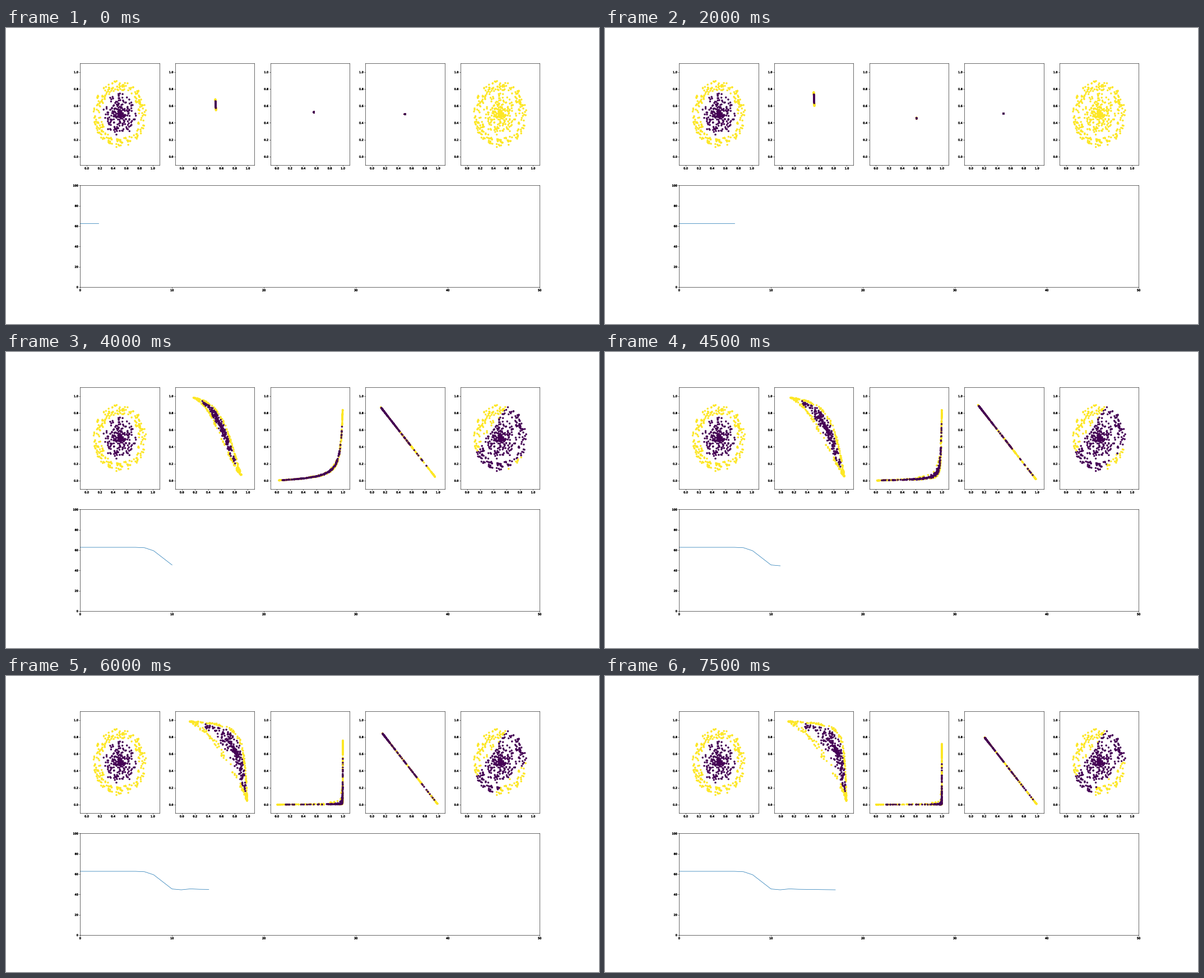
Write a matplotlib script that moves like this. It is 1058x529 px and loops after 8000 ms.

```python
import numpy as np
import matplotlib.pyplot as plt
from matplotlib.animation import FuncAnimation
from matplotlib.patheffects import withStroke

STEPS, STEP_MS = 16, 500
YELLOW, PURPLE = "#fde725", "#440154"
LINE_PT = 1.2

plt.rcParams.update({
    "font.family": "DejaVu Sans",
    "font.size": 10,
    "axes.linewidth": LINE_PT,
    "xtick.major.width": LINE_PT,
    "ytick.major.width": LINE_PT,
})


def sigmoid(z):
    return 1 / (1 + np.exp(-z))


def phases(step):
    """Progress of the three stages of training, each from 0 to 1."""
    wake = sigmoid((step - 6) / 0.6)
    turn = np.clip((step - 6) / 2, 0, 1)
    settle = 1 - np.exp(-max(step - 8, 0) / 3)
    return wake, turn, settle


def along(points, degrees):
    a = np.radians(degrees)
    return (points - 0.5) @ np.array([np.cos(a), np.sin(a)])


def make_data(n=240):
    rng = np.random.default_rng(11)
    r = np.concatenate([rng.uniform(0, 0.25, n), rng.uniform(0.285, 0.4, n)])
    t = rng.uniform(0, 2 * np.pi, 2 * n)
    points = 0.5 + np.column_stack([r * np.cos(t), r * np.sin(t)])
    ring = np.arange(2 * n) >= n
    # ring points tend to lie beneath the core
    order = np.argsort(rng.random(2 * n) - 0.5 * ring)
    return points[order], ring[order]


def layer1(step):
    wake, turn, settle = phases(step)
    axis = 165 - 25 * turn
    skew = 10 * turn + 15 * settle
    u = along(points, axis + skew / 2) / 0.4
    v = along(points, axis + 180 - skew / 2) / 0.4
    rise = 0.08 * step * (1 - wake) + 1.2 * np.exp(-(step - 6.6) ** 2)
    cx = 0.05 - 1.1 * wake * (1 - wake) + 0.35 * wake ** 3 + 1.3 * settle
    cy = 0.47 + rise + 0.2 * settle
    rx = 0.02 + 2.1 * wake ** 3 + 1.75 * settle
    ry = 0.28 + 3.2 * wake + 0.35 * settle
    return sigmoid(np.column_stack([cx + rx * u, cy + ry * v]))


def layer2(h, step):
    wake, turn, settle = phases(step)
    drift = step * (1 - wake)
    wx = [6 * turn + 8.5 * settle, 2.1 * wake - 7 * turn + 5.3 * settle]
    wy = [3 * turn - 2.8 * settle, -7.2 * wake + 1.2 * turn - 3 * settle]
    bx = 0.24 + 0.06 * drift - 1.5 * wake + 1.6 * turn - 7.7 * settle
    by = 0.1 - 0.05 * drift + 2.2 * wake - 2.9 * turn + 1.6 * settle
    return sigmoid(np.column_stack([h @ wx + bx, h @ wy + by]))


def layer3(h, step):
    wake, turn, settle = phases(step)
    w = [-4.05 * turn + 1.6 * settle, 8 * wake + 0.6 * settle]
    b = -0.85 * np.sqrt(wake) + 1.45 * turn + 0.7 * settle
    z = h @ w + b
    return sigmoid(np.column_stack([z, -z]))


def predict(step):
    """Everything starts yellow, then a purple band opens across the disc."""
    if step < 6:
        return np.ones(len(points), bool)
    _, turn, settle = phases(step)
    yellow = along(points, 165 - 25 * turn) > 0.03 + 0.135 * turn
    if step >= 8:
        yellow |= along(points, -52) > 0.36 - 0.16 * settle
    return yellow


def colours(mask):
    return np.where(mask, YELLOW, PURPLE)


def style(ax, xlim, ylim, xticks, yticks):
    ax.set(xlim=xlim, ylim=ylim, xticks=xticks, yticks=yticks)
    for label in ax.get_xticklabels() + ax.get_yticklabels():
        label.set_path_effects([withStroke(linewidth=0.8, foreground="black")])


points, ring = make_data()
epochs = np.arange(STEPS + 2)
loss = np.interp(epochs, [6, 7, 8, 10, 11, 12, 13, 17],
                 [62.7, 62.3, 59.3, 45.3, 44.5, 45.4, 45.0, 44.5])

fig = plt.figure(figsize=(30, 15), dpi=35.2667, facecolor="white")
grid = fig.add_gridspec(2, 5, left=0.125, right=0.9, bottom=0.125, top=0.88,
                        wspace=0.2, hspace=0.2)

clouds = []
unit = np.arange(6) / 5
for i in range(5):
    ax = fig.add_subplot(grid[0, i])
    clouds.append(ax.scatter(*points.T, s=36, c=colours(ring)))
    style(ax, (-0.1, 1.1), (-0.1, 1.1), unit, unit)

loss_ax = fig.add_subplot(grid[1, :])
loss_line, = loss_ax.plot([], [], color="#1f77b4", lw=1.5)
style(loss_ax, (0, 50), (0, 100), range(0, 51, 10), range(0, 101, 20))


def draw(step):
    h1 = layer1(step)
    h2 = layer2(h1, step)
    for cloud, h in zip(clouds[1:4], (h1, h2, layer3(h2, step))):
        cloud.set_offsets(h)
    clouds[4].set_color(colours(predict(step)))
    n = step + 3
    loss_line.set_data(epochs[:n], loss[:n])
    return [*clouds, loss_line]


anim = FuncAnimation(fig, draw, frames=STEPS, init_func=lambda: draw(0),
                     interval=STEP_MS, repeat=True)
plt.show()
```
